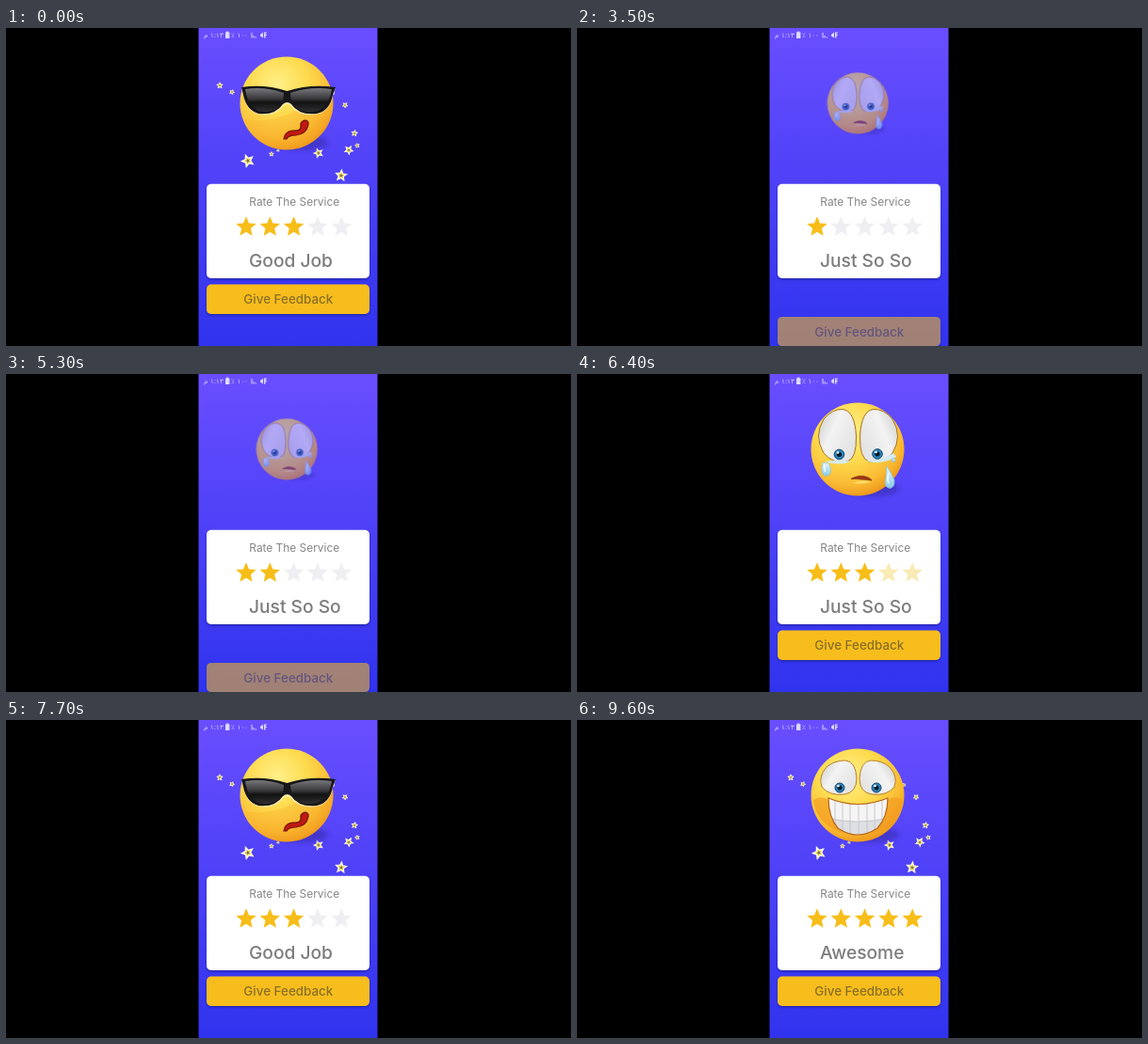
Write an HTML page that moves like this. It is 600 px wide and 338 px high and loops after 9.7 s.

```html
<!DOCTYPE html>
<html lang="en">
<head>
<meta charset="utf-8">
<title>Rate the service</title>
<style>
html, body { margin: 0; width: 100%; height: 100%; overflow: hidden; background: #000; }
svg { display: block; width: 100vw; height: 100vh; }
text { font-family: Inter, "Open Sans", sans-serif; fill: #7c7c7c; }
.title { font-size: 11.9px; fill: #858585; }
.label { font-size: 19.2px; font-weight: 500; }
.action { font-size: 13.4px; font-weight: 500; fill: #8a6f28; text-anchor: middle; }
.status { opacity: .85; }
.status text { font: 7px "DejaVu Sans", sans-serif; fill: #f4f2ff; }

/* One 9.7 s loop; ratings are tapped at 2.7, 4.5, 6.4 and 8.3 s */
.pop, .rise, .cool, .sad, .glad, .sparkles, .s2, .s3, .s4, .s5 {
  animation: 9.7s step-end infinite;
}
.pop { animation-name: pop; animation-timing-function: steps(7); transform-origin: 298.5px 80px; }
.rise { animation-name: rise; animation-timing-function: steps(7); }
.sparkles { animation-name: sparkle; animation-timing-function: steps(4); transform-origin: 298px 110px; }
.cool { animation-name: cool; }
.sad { animation-name: sad; }
.glad { animation-name: glad; }
.stars { --on: #f7bd18; --off: #efeef2; --press: #f8ebb4; fill: var(--on); }
.s2 { animation-name: second; }
.s3 { animation-name: third; }
.s4, .s5 { animation-name: last; }

@keyframes pop {
  0%, 31.958%, 39.175%, 50.514%, 57.732%, 70.102%, 77.32%, 89.69%, 96.907%, 100% { transform: none; opacity: 1; }
  31.959%, 50.515%, 70.103%, 89.691% { transform: scale(.2); opacity: 0; }
}
@keyframes rise {
  0%, 31.958%, 39.175%, 50.514%, 57.732%, 70.102%, 77.32%, 89.69%, 96.907%, 100% { transform: none; opacity: 1; }
  31.959%, 50.515%, 70.103%, 89.691% { transform: translateY(80px); opacity: 0; }
}
@keyframes sparkle {
  0%, 27.835%, 79.381%, 89.69%, 98.969%, 100% { transform: none; opacity: 1; }
  31.959%, 75.258%, 89.691%, 94.845% { transform: scale(1.25); opacity: 0; }
}
@keyframes cool {
  0%, 70.103% { visibility: visible; }
  31.959%, 89.691%, 100% { visibility: hidden; }
}
@keyframes sad {
  0%, 70.103%, 100% { visibility: hidden; }
  31.959% { visibility: visible; }
}
@keyframes glad {
  0% { visibility: hidden; }
  89.691%, 100% { visibility: visible; }
}
@keyframes second {
  0%, 46.392%, 100% { fill: var(--on); }
  27.835% { fill: var(--press); }
  28.866% { fill: var(--off); }
}
@keyframes third {
  0%, 65.979%, 100% { fill: var(--on); }
  27.835%, 46.392% { fill: var(--press); }
  28.866%, 47.423% { fill: var(--off); }
}
@keyframes last {
  0%, 28.866%, 47.423%, 67.01% { fill: var(--off); }
  27.835%, 46.392%, 65.979% { fill: var(--press); }
  85.567%, 100% { fill: var(--on); }
}
</style>
</head>
<body>
<svg viewBox="0 0 600 338" preserveAspectRatio="none">
  <defs>
    <linearGradient id="sky" x2="0" y2="1">
      <stop stop-color="#694eff"/><stop offset="1" stop-color="#3033ee"/>
    </linearGradient>
    <radialGradient id="skin" cx=".4" cy=".3" r=".72">
      <stop stop-color="#fff08a"/><stop offset=".45" stop-color="#fddb4f"/>
      <stop offset=".8" stop-color="#fabb33"/><stop offset="1" stop-color="#ee981c"/>
    </radialGradient>
    <linearGradient id="lens" x2="0" y2="1">
      <stop stop-color="#77777b"/><stop offset=".45" stop-color="#37373a"/><stop offset=".6" stop-color="#111"/><stop offset="1" stop-color="#303033"/>
    </linearGradient>
    <linearGradient id="eye" x2="1" y2=".6">
      <stop stop-color="#cbc9c8"/><stop offset=".45" stop-color="#f3f3f3"/><stop offset="1" stop-color="#e4e3e3"/>
    </linearGradient>
    <linearGradient id="tear" x2="0" y2="1">
      <stop stop-color="#e4f6fc"/><stop offset="1" stop-color="#86cbe9"/>
    </linearGradient>
    <filter id="soft" x="-30%" y="-40%" width="160%" height="180%"><feGaussianBlur stdDeviation="2.5"/></filter>
    <filter id="shade" x="-5%" y="-10%" width="110%" height="130%">
      <feDropShadow dx="0" dy="1.3" stdDeviation="1.3" flood-color="#111a70" flood-opacity=".6"/>
    </filter>
    <clipPath id="grin"><path d="M267 83Q298 96 330 83Q330 103 319 115Q298 129 277 115Q267 103 267 83Z"/></clipPath>
    <clipPath id="phone"><path d="M204.500 0H394.500V338H204.500Z"/></clipPath>
  </defs>

  <rect width="600" height="338"/>
  <g clip-path="url(#phone)">
    <rect x="204" width="191" height="338" fill="url(#sky)"/>

    <g class="status" fill="#f4f2ff">
      <text x="210" y="9.500">م</text>
      <text x="217" y="9.500">١:١٣</text>
      <path d="M233 4.500h1.200v-1h2v1h1.200v6.500h-4.400z"/>
      <text x="239" y="9.500">٪</text>
      <text x="245.500" y="9.500">١٠٠</text>
      <path d="M260.500 5h1v5.500h-1zM262.500 8h1v2.500h-1zM264.500 9.500h1.500v1h-1.500z"/>
      <path d="M270 7l3-2.500v6l-3-2zM274 4.500h3v1h-1.500v1.500h1.500v1h-1.500V10.500H274z"/>
    </g>

    <g class="sparkles" id="sparkles" fill="#fff48c" stroke="#fffbe0" stroke-width="2.5"></g>

    <g class="pop">
      <ellipse cx="314" cy="122" rx="28" ry="8" fill="#2a2187" opacity=".4" filter="url(#soft)"/>
      <circle cx="298" cy="80" r="49.5" fill="url(#skin)"/>

      <g class="cool">
        <path d="M253 97Q289 105 345 67Q351 95 328 118Q300 137 270 119Q259 111 253 97Z" fill="#f7a526" opacity=".25"/>
        <path d="M295 118Q296 110 304 109Q314 110 313 104Q312 100 317 98Q322 98 321 103Q319 113 308 114Q300 114 298 118Z" fill="#c01911" stroke="#6e1409" stroke-width="1.2"/>
        <path d="M250 64Q274 60 298.500 68Q323 60 350 64L347 72Q344 89 330 92Q311 95 303 83Q298.500 79 294 83Q286 95 268 92Q255 88 252 72Z" fill="#f7f7f0" opacity=".55"/>
        <path d="M250 63Q274 59 298.500 67Q323 59 350 63L347 71Q344 88 330 91Q311 93 303 81Q298.500 77 294 81Q286 93 268 91Q255 87 252 71Z" fill="#171719"/>
        <path d="M254 65Q275 62 295 69Q295 87 278 89Q258 91 254 65ZM346 65Q322 62 302 69Q302 87 319 89Q342 91 346 65Z" fill="url(#lens)"/>
      </g>

      <g class="sad">
        <g fill="url(#eye)" stroke="#a9741e">
          <path id="droop" d="M282 37.500Q295 39 296.500 66Q297 90 287 93Q272 96 262 84Q251 66 262 48Q271 37 282 37.500Z"/>
          <path d="M282 37.500Q295 39 296.500 66Q297 90 287 93Q272 96 262 84Q251 66 262 48Q271 37 282 37.500Z" transform="translate(597) scale(-1 1)"/>
        </g>
        <path d="M263 93Q277 98 291 93Q280 91 275 92ZM307 92Q321 98 339 88L336 84Q327 91 307 92Z" fill="#d3ebf2"/>
        <g fill="#2a82b8" stroke="#174b70"><circle cx="278.500" cy="85.500" r="5.300"/><circle cx="319" cy="85" r="5.300"/></g>
        <g fill="#071c2b"><circle cx="278.500" cy="85.500" r="2.600"/><circle cx="319" cy="85" r="2.600"/></g>
        <g fill="#fff"><circle cx="277" cy="83.500" r="1.300"/><circle cx="317.500" cy="83" r="1.300"/></g>
        <path d="M293 116Q302 111 312 115Q303 117.500 293 116Z" fill="#ffd968"/>
        <path d="M291 111.500Q299 107 306 109Q311 110 313 113Q307 112 302 112Q296 111 291 111.500Z" fill="#a8341b" stroke="#73310c" stroke-width=".8"/>
        <g fill="url(#tear)" stroke="#8cc2d8" stroke-width=".7">
          <path d="M260.500 95Q267 92 269 99Q271 108 264 108.500Q258 107 260.500 95Z"/>
          <path d="M329 98Q334 105 337 113Q337.500 121 332 121.500Q325 120 328 110Z"/>
          <circle cx="336" cy="91.500" r="2"/>
        </g>
        <path d="M263 97q-1 5 1 7M331 105q-2 7 0 11" fill="none" stroke="#fff" stroke-width="1.500"/>
      </g>

      <g class="glad">
        <path d="M251 85Q264 77 274 93L282 120Q254 111 251 85ZM346 85Q333 77 323 93L315 120Q343 111 346 85Z" fill="#f49a20" opacity=".65"/>
        <g fill="url(#eye)" stroke="#b98225">
          <path d="M285 43Q296 44 297 62Q297 77 284 79Q268 81 260 71Q256 60 265 50Q273 43 285 43Z"/>
          <path d="M285 43Q296 44 297 62Q297 77 284 79Q268 81 260 71Q256 60 265 50Q273 43 285 43Z" transform="translate(597) scale(-1 1)"/>
        </g>
        <g fill="#2a82b8" stroke="#174b70"><circle cx="279" cy="72" r="5"/><circle cx="318" cy="72" r="5"/></g>
        <g fill="#071c2b"><circle cx="279" cy="72" r="2.500"/><circle cx="318" cy="72" r="2.500"/></g>
        <g fill="#fff"><circle cx="277.500" cy="70" r="1.300"/><circle cx="316.500" cy="70" r="1.300"/></g>
        <g clip-path="url(#grin)">
          <path d="M265 80H332V130H265Z" fill="#f5f5f5"/>
          <path d="M265 104Q298 112 332 104V130H265Z" fill="#dedfe2"/>
          <path d="M265 104Q298 112 332 104M274 80V130M282 80V130M290 80V130M299 80V130M308 80V130M316 80V130M324 80V130" fill="none" stroke="#bebec4" stroke-width=".8"/>
        </g>
        <path d="M267 83Q298 96 330 83Q330 103 319 115Q298 129 277 115Q267 103 267 83Z" fill="none" stroke="#b5661a" stroke-width="1.200"/>
      </g>
    </g>

    <rect x="213" y="165.700" width="173" height="100.300" rx="5" fill="#fff" filter="url(#shade)"/>
    <text class="title" x="258.300" y="188.700">Rate The Service</text>
    <g class="stars" id="stars"></g>
    <text class="label cool" x="258" y="253.700">Good Job</text>
    <text class="label sad" x="258" y="253.700">Just So So</text>
    <text class="label glad" x="258" y="253.700">Awesome</text>

    <g class="rise">
      <rect x="213" y="272.600" width="173" height="31.400" rx="5" fill="#f6bd1c" filter="url(#shade)"/>
      <text class="action" x="299.800" y="293.300">Give Feedback</text>
    </g>
  </g>
</svg>
<script>
const STAR = 'M0 5.270L6.180 9 4.540 1.970 10-2.760 2.810-3.370 0-10-2.810-3.370-10-2.760-4.540 1.970-6.180 9Z';

function addStar(parent, x, y, scale, turn = 0) {
  const star = document.createElementNS(parent.namespaceURI, 'path');
  star.setAttribute('d', STAR);
  star.setAttribute('transform', `translate(${x} ${y}) rotate(${turn}) scale(${scale})`);
  parent.append(star);
  return star;
}

const stars = document.getElementById('stars');
for (let i = 0; i < 5; i++) {
  addStar(stars, 255 + 25.3 * i, 211, 1.07).setAttribute('class', 's' + (i + 1));
}

// x, y, radius
const sparkles = document.getElementById('sparkles');
[[227, 61, 3.2], [240, 68, 2.6], [257, 141, 5.8], [282, 134, 2.4], [289, 130, 1.6], [332, 133, 4.4],
 [356, 157, 5.4], [364, 130, 4.2], [373, 125, 2.4], [370, 112, 3.2], [360, 82, 2.8], [347, 69, 2]]
  .forEach(([x, y, r], i) => {
    addStar(sparkles, x, y, r / 10, i * 25);
    const core = addStar(sparkles, x, y, r / 20, i * 25);
    core.setAttribute('fill', '#7a6a62');
    core.setAttribute('stroke', '#e6cf3d');
  });
</script>
</body>
</html>
```
